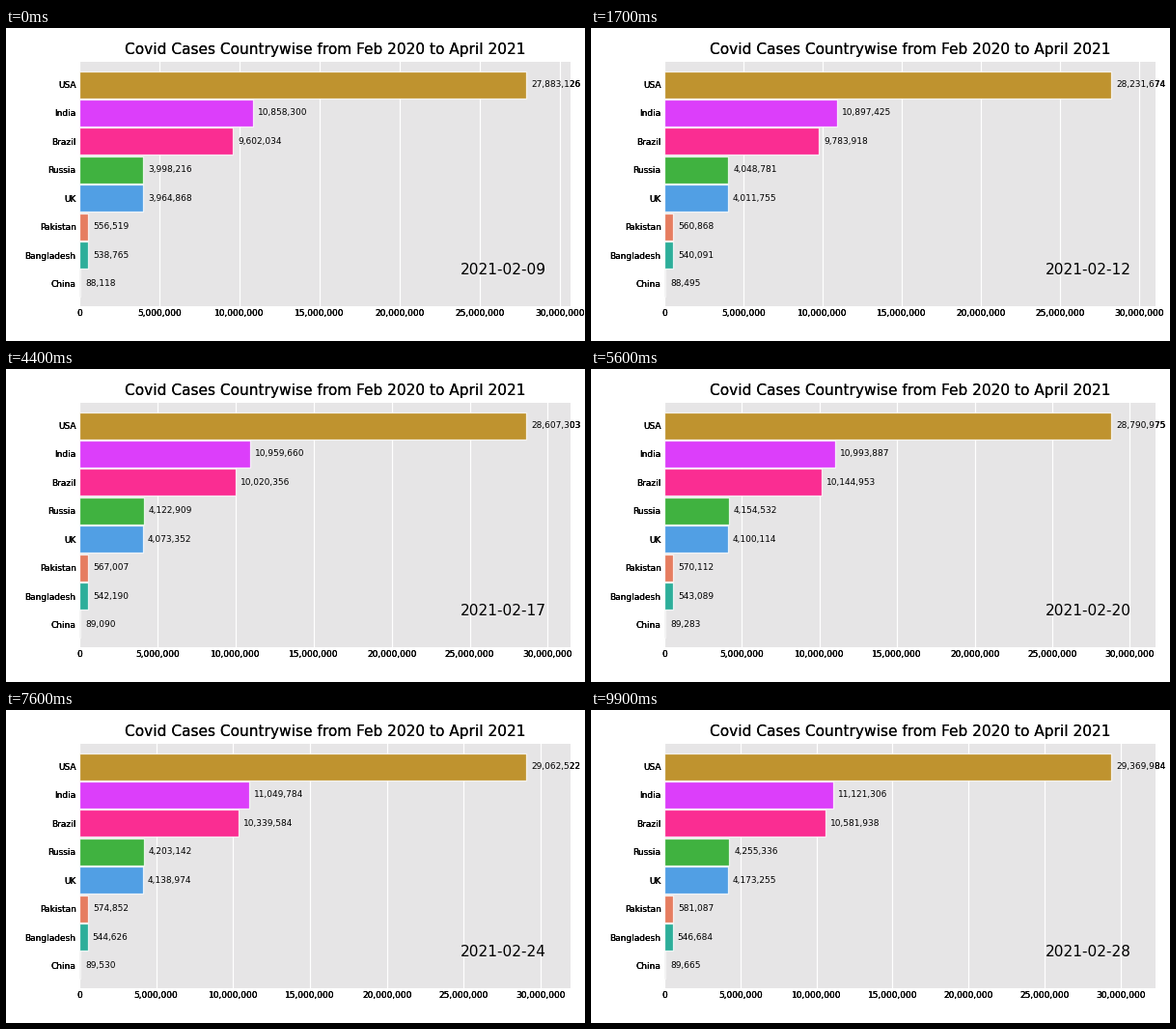
These frames come from a looping animation (600 px wide and 324 px high, 10000 ms). A matplotlib script:

```python
import numpy as np
import matplotlib.pyplot as plt
from matplotlib.animation import FuncAnimation
from matplotlib.transforms import Bbox, TransformedBbox

W, H, DPI = 600, 324, 100
LEFT, RIGHT, TOP, BOTTOM = 76, 585.2, 35, 288
FRAMES, STEPS_PER_DAY = 100, 5
START = np.datetime64("2021-02-09")
PT = 72 / DPI
SMALL, LARGE = 8.97 * PT, 15.39 * PT

# Days on which totals are known; weekday rhythm (Wed..Tue) shapes the rest.
DAYS = np.array([0, 3.4, 5.8, 8.8, 11.2, 15.2, 19.8])
COUNTRIES = [
    ("China", "#9a9a9a", [1, 1, 1, 1, 1, 1, 1],
     [88118, 88495, 88783, 89090, 89283, 89530, 89665]),
    ("Bangladesh", "#2dae9a", [39, 42, 40, 29, 33, 45, 40],
     [538765, 540091, 540949, 542190, 543089, 544626, 546684]),
    ("Pakistan", "#e67d60", [11, 13, 13, 12, 12, 10, 10],
     [556519, 560868, 563867, 567007, 570112, 574852, 581087]),
    ("UK", "#519fe4", [130, 134, 150, 130, 110, 100, 105],
     [3964868, 4011755, 4038475, 4073352, 4100114, 4138974, 4173255]),
    ("Russia", "#40b240", [143, 149, 150, 145, 140, 138, 130],
     [3998216, 4048781, 4083249, 4122909, 4154532, 4203142, 4255336]),
    ("Brazil", "#fa2d92", [60, 55, 52, 50, 28, 32, 60],
     [9602034, 9783918, 9860271, 10020356, 10144953, 10339584, 10581938]),
    ("India", "#dc3efa", [130, 132, 140, 140, 140, 100, 125],
     [10858300, 10897425, 10923483, 10959660, 10993887, 11049784, 11121306]),
    ("USA", "#bf932f", [72, 75, 80, 70, 55, 56, 65],
     [27883126, 28231674, 28398285, 28607303, 28790975, 29062522, 29369984]),
]
N = len(COUNTRIES)
TICKS = np.arange(0, 31, 5) * 1_000_000


def totals(rhythm, known):
    """Running totals for every step, passing through the known values."""
    pace = np.concatenate([[0], np.cumsum(np.tile(rhythm, 3))])
    clock = np.arange(len(pace))
    steps = np.arange(FRAMES) / STEPS_PER_DAY
    return np.interp(np.interp(steps, clock, pace),
                     np.interp(DAYS, clock, pace), known)


SERIES = np.array([totals(c[2], c[3]) for c in COUNTRIES])

plt.rcParams["font.family"] = "DejaVu Sans"
fig = plt.figure(figsize=(W / DPI, H / DPI), dpi=DPI, facecolor="white")
ax = fig.add_axes([LEFT / W, 1 - BOTTOM / H, (RIGHT - LEFT) / W, (BOTTOM - TOP) / H])
ax.set_facecolor("#e6e5e6")
ax.set_ylim(0.2, N + 0.8)
ax.set_xticks(TICKS)
ax.set_yticks([])
ax.tick_params(length=0, labelbottom=False)
ax.grid(axis="x", color="white", lw=0.85)
ax.set_axisbelow(True)
for spine in ax.spines.values():
    spine.set_visible(False)


def heavy(x, y, text, size=SMALL, copies=3, **kw):
    """Text stacked on itself, which thickens its antialiased edges."""
    return [fig.text(x / W, 1 - y / H, text, size=size, **kw) for _ in range(copies)]


def row_y(i):
    return BOTTOM - (i + 0.8) * (BOTTOM - TOP) / (N + 0.6)


heavy((LEFT + RIGHT) / 2, 27, "Covid Cases Countrywise from Feb 2020 to April 2021",
      LARGE, copies=2, ha="center")
for i, country in enumerate(COUNTRIES):
    heavy(LEFT - 3.4, row_y(i), country[0], ha="right", va="center_baseline")
tick_labels = [heavy(0, 298, f"{t:,}", ha="center") for t in TICKS]

bars = ax.barh(np.arange(1, N + 1), SERIES[:, 0], height=0.95,
               color=[c[1] for c in COUNTRIES], edgecolor=(1, 1, 1, 0.8), lw=0.92)
values = [ax.text(0, i + 1, "", size=SMALL, va="center") for i in range(N)]
period = ax.text(0.95, 0.15, "", size=LARGE, ha="right", va="center",
                 transform=ax.transAxes)

# The part of the top value that runs past the plot is heavier.
margin = TransformedBbox(Bbox([[RIGHT / W, 0], [1, 1]]), fig.transFigure)
overflow = [ax.text(0, N, "", size=SMALL, va="center") for _ in range(2)]
for label in overflow:
    label.set_clip_box(margin)
    label.set_clip_on(True)


def draw(frame):
    now = SERIES[:, frame]
    limit = now.max() * 1.1
    ax.set_xlim(0, limit)
    for bar, label, value in zip(bars, values, now):
        bar.set_width(value)
        label.set_x(value + 0.01 * limit)
        label.set_text(f"{value:,.0f}")
    for label in overflow:
        label.set_x(values[-1].get_position()[0])
        label.set_text(values[-1].get_text())
    for tick, stack in zip(TICKS, tick_labels):
        for label in stack:
            label.set_x((LEFT + (RIGHT - LEFT) * tick / limit) / W)
    period.set_text(str(START + frame // STEPS_PER_DAY))
    return []


anim = FuncAnimation(fig, draw, frames=FRAMES, interval=100, repeat=True, blit=False)
plt.show()
```
